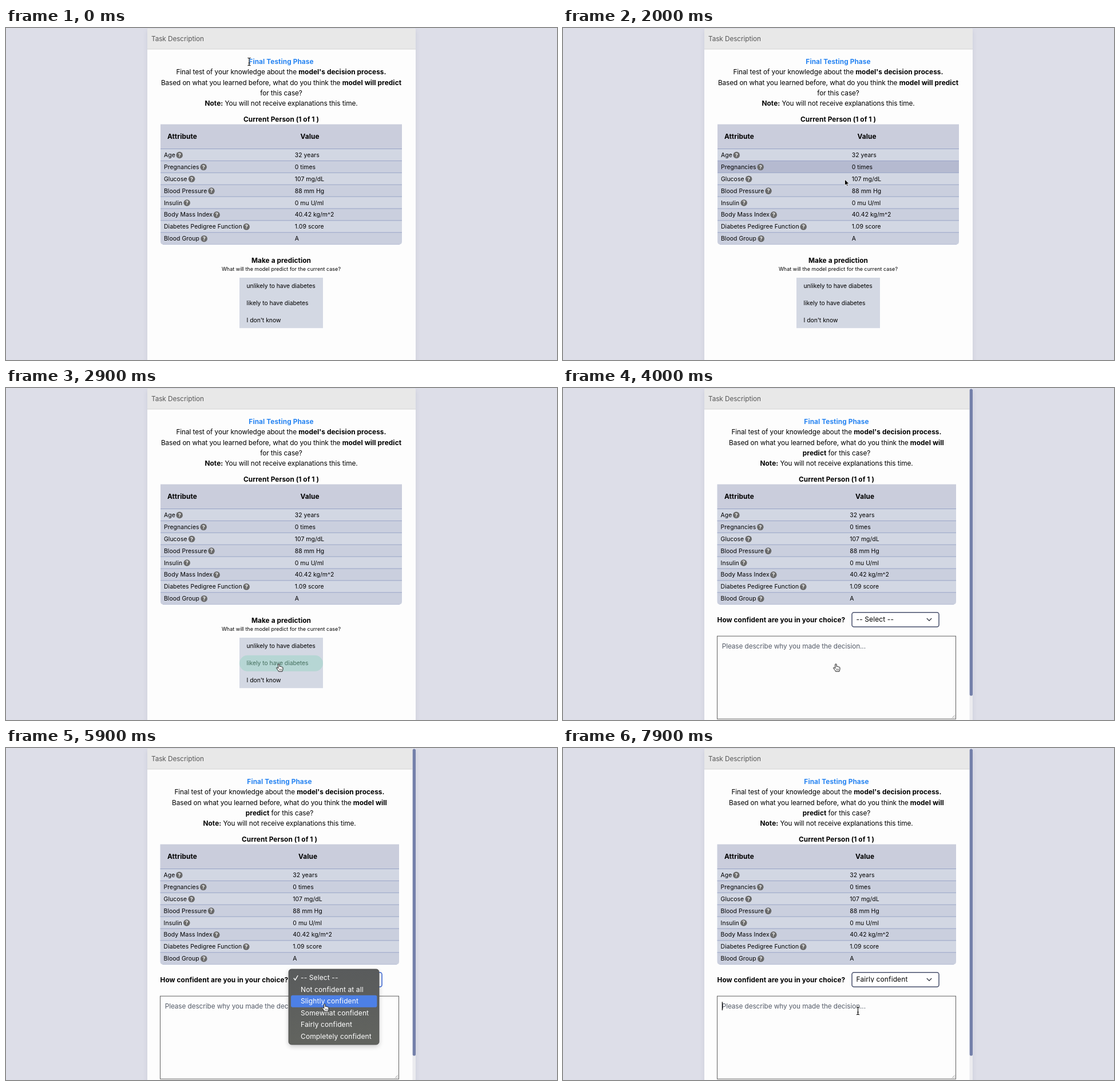
Animation, 963 px wide and 581 px high, one loop 8000 ms. Source, as an HTML page:

```html
<!DOCTYPE html>
<html lang="en">
<head>
<meta charset="utf-8">
<title>Task Description</title>
<style>
html, body { margin: 0; width: 100%; height: 100%; overflow: hidden; background: #dddee8; }
svg { display: block; width: 963px; height: 581px; }
text { font: 11.8px Inter, "Open Sans", sans-serif; letter-spacing: -.007em; fill: #000; white-space: pre; }
.b { font-weight: 700; letter-spacing: .008em; }
.row { font-size: 10.4px; letter-spacing: .006em; }
.pick { font-size: 10.4px; letter-spacing: -.003em; }
.small { font-size: 8.95px; letter-spacing: .006em; }
.ctl { font-size: 12px; letter-spacing: .01em; }
.mid { text-anchor: middle; }
</style>
</head>
<body>
<svg id="stage" viewBox="0 0 963 581" xmlns="http://www.w3.org/2000/svg">
  <defs>
    <filter id="soft" x="-10%" y="-10%" width="120%" height="120%"><feGaussianBlur stdDeviation="4"/></filter>
    <clipPath id="selClip"><rect x="506" y="393" width="125" height="17.3"/></clipPath>
    <linearGradient id="menuFill" x2="0" y2="1">
      <stop offset="0" stop-color="#595b5c"/><stop offset="1" stop-color="#62645f"/>
    </linearGradient>
  </defs>
</svg>
<script>
const NS = 'http://www.w3.org/2000/svg';
const LOOP = 8000, STEP = 100;
const SWITCH = 3800, OPEN = 5300, CLOSE = 7000, CARET = 7800;
const ROW_TOP = 211.5, ROW_H = 20.9;

const rows = [
  ['Age', '32 years', 303.2],
  ['Pregnancies', '0 times', 345.2],
  ['Glucose', '107 mg/dL', 324.6],
  ['Blood Pressure', '88 mm Hg', 359],
  ['Insulin', '0 mu U/ml', 316.2],
  ['Body Mass Index', '40.42 kg/m^2', 368.2],
  ['Diabetes Pedigree Function', '1.09 score', 420.2],
  ['Blood Group', 'A', 346.2]
];
const options = ['unlikely to have diabetes', 'likely to have diabetes', "I don't know"];
const levels = ['-- Select --', 'Not confident at all', 'Slightly confident',
  'Somewhat confident', 'Fairly confident', 'Completely confident'];

// pointer hot spot: time, x, y
const path = [
  [0, 425, 59], [100, 425, 59], [500, 470, 66], [900, 505, 84], [1300, 520, 118],
  [1800, 496, 200], [2000, 492.5, 265], [2300, 485, 345], [2700, 477, 478], [2900, 477, 483],
  [4200, 477, 483], [4700, 535, 440], [5000, 566, 409], [5300, 566, 409],
  [5900, 557, 448], [6100, 556, 452], [6500, 553.5, 483], [6700, 553.5, 484],
  [7000, 553.5, 484], [7500, 515.5, 460], [8000, 515.5, 460]
];

const stage = document.getElementById('stage');

function add(parent, tag, attrs, text) {
  const el = document.createElementNS(NS, tag);
  for (const k in attrs) el.setAttribute(k, attrs[k]);
  if (text !== undefined) el.textContent = text;
  parent.appendChild(el);
  return el;
}
const group = parent => add(parent, 'g', {});
const rect = (p, x, y, width, height, fill, more) => add(p, 'rect', { x, y, width, height, fill, ...more });
const label = (p, x, y, str, cls = '', more) => add(p, 'text', { x, y, class: cls, ...more }, str);
const show = (el, on) => el.setAttribute('visibility', on ? 'visible' : 'hidden');

// centred line; parts between asterisks are bold
function line(p, x, y, str) {
  const el = label(p, x, y, '', 'mid');
  str.split('*').forEach((s, i) => { if (s) add(el, 'tspan', i % 2 ? { class: 'b' } : {}, s); });
}

function table(p, x, w, dx, valueX) {
  const end = ROW_TOP + rows.length * ROW_H;
  rect(p, x, 168.5, w, ROW_TOP - 168.5, '#cacddc');
  label(p, 282, 194.3, 'Attribute', 'b');
  label(p, valueX + 9.8, 194.3, 'Value', 'b');
  const fills = rows.map(([name, value, icon], i) => {
    const y = ROW_TOP + i * ROW_H, last = i === rows.length - 1;
    const d = last
      ? `M${x} ${y}h${w}V${end - 5}q0 5-5 5H${x + 5}q-5 0-5-5Z`
      : `M${x} ${y}h${w}v${ROW_H}h${-w}Z`;
    const fill = add(p, 'path', { d });
    add(p, 'path', { d: `M${x} ${y}h${w}`, stroke: '#98a3c6', 'stroke-width': 1 });
    label(p, 276 + dx, y + 14.4, name, 'row');
    label(p, valueX, y + 14.4, value, 'row');
    add(p, 'circle', { cx: icon + dx, cy: y + 10.9, r: 5.8, fill: '#6b6b6b' });
    label(p, icon + dx, y + 14.2, '?', 'b mid', { style: 'font-size:9px;fill:#fff' });
    return fill;
  });
  add(p, 'path', { d: `M${x + 4} ${end}h${w - 8}`, stroke: '#a9b2cc', 'stroke-width': .8 });
  return fills;
}

function scene(cx, wrapped, x, w, dx, valueX) {
  const g = group(stage);
  label(g, cx, 63.2, 'Final Testing Phase', 'b mid', { style: 'fill:#2784f2' });
  line(g, cx, 81.4, "Final test of your knowledge about the *model's decision process.*");
  line(g, cx, 99.8, 'Based on what you learned before, what do you think the *model will' + (wrapped ? '*' : ' predict*'));
  line(g, cx, 118.1, (wrapped ? '*predict* ' : '') + 'for this case?');
  line(g, cx, 136.4, '*Note:* You will not receive explanations this time.');
  label(g, cx, 164, 'Current Person (1 of 1 )', 'b mid');
  return { g, fills: table(g, x, w, dx, valueX) };
}

// panel
rect(stage, 247, 4, 469, 590, '#7d82a0', { opacity: .2, filter: 'url(#soft)' });
rect(stage, 247, 1, 469, 600, '#fdfdfd', { rx: 3 });
add(stage, 'path', { d: 'M247 37V4q0-3 3-3H713q3 0 3 3V37Z', fill: '#e8e8e8' });
rect(stage, 247, 36.5, 469, 1, '#d6d6d6');
label(stage, 254, 22.8, 'Task Description', '', { style: 'fill:#575757' });

// first view: prediction
const ask = scene(481, false, 270, 422, 0, 504.7);
label(ask.g, 481, 411, 'Make a prediction', 'b mid');
label(ask.g, 481, 424.8, 'What will the model predict for the current case?', 'small mid');
rect(ask.g, 408, 437, 146, 88.2, '#d3d8e3');
const picks = options.map((str, i) => ({
  pill: rect(ask.g, 408, 437.4 + i * 30.4, 146, 28, '#b6d6d4', { rx: 14 }),
  text: label(ask.g, 420.5, 454.6 + i * 30.4, str, 'pick')
}));

// second view: confidence form
const form = scene(478, true, 269.5, 417.5, -.4, 501.3);
rect(form.g, 710.5, 1, 5.5, 580, '#ebebef');
rect(form.g, 710.7, 1.5, 5.3, 537, '#7480aa', { rx: 2.6 });
label(form.g, 269.5, 409.5, 'How confident are you in your choice?', 'b');
const select = rect(form.g, 505, 392.7, 152, 25.2, '#fff', { rx: 3.5, 'stroke-width': 1.5 });
const chosen = label(form.g, 512.5, 409.4, '', 'ctl', { 'clip-path': 'url(#selClip)' });
add(form.g, 'path', { d: 'M635.8 403l4.2 4.2 4.2-4.2', fill: 'none', stroke: '#3c404c', 'stroke-width': 1.4 });
rect(form.g, 269.5, 434.2, 417, 145, '#fdfdfd', { stroke: '#606060', 'stroke-width': 1 });
add(form.g, 'path', { d: 'M680 577.5l5-5M683 577.5l2-2', stroke: '#777', 'stroke-width': .8 });
label(form.g, 277.7, 455.8, 'Please describe why you made the decision...', '', { style: 'fill:#555c69' });
const caret = rect(form.g, 277.8, 444.3, 1.2, 14.7, '#000');

// drop-down list
const menu = group(stage);
rect(menu, 494, 390, 158, 132, '#000', { rx: 5, opacity: .22, filter: 'url(#soft)' });
rect(menu, 494, 387, 158, 132, 'url(#menuFill)', { rx: 5, stroke: '#4a4a4a', 'stroke-width': .8 });
const bar = rect(menu, 498, 0, 150.4, 21, '#4d80e6', { rx: 3 });
levels.forEach((str, i) => label(menu, 515, 406.2 + i * 20.55, str, 'ctl', { style: 'fill:#fff' }));
add(menu, 'path', { d: 'M502.8 402.6l2.6 3.4 4.8-8', fill: 'none', stroke: '#fff', 'stroke-width': 1.4 });

// pointers
const beamD = 'M-2.6-6.7C-1-6.7 0-6.2 0-5V5C0 6.2-1 6.7-2.6 6.7M2.6-6.7C1-6.7 0-6.2 0-5M0 5C0 6.2 1 6.7 2.6 6.7M-1.5 2.2H1.5';
const pointers = { beam: group(stage), arrow: group(stage), hand: group(stage) };
add(pointers.beam, 'path', { d: beamD, fill: 'none', stroke: '#fff', 'stroke-width': 2.2, opacity: .7 });
add(pointers.beam, 'path', { d: beamD, fill: 'none', stroke: '#111', 'stroke-width': 1.1 });
add(pointers.arrow, 'path', {
  d: 'M0 0V10.6L2.5 8.3L4.1 12L5.8 11.2L4.2 7.7H7.6Z',
  fill: '#000', stroke: '#fff', 'stroke-width': .8
});
add(pointers.hand, 'path', {
  d: 'M-1.3 .9C-1.3-.5 1.1-.5 1.1 .9V4.6C1.6 3.8 3 4 3.2 5C3.8 4.3 5 4.6 5.1 5.5C5.8 5 6.9 5.4 6.9 6.4V9.2C6.9 10.6 6.1 11.2 5.9 13H-.6C-.9 11.4-2.6 9.8-4.3 7.4C-5 6.3-3.6 5.6-2.7 6.5L-1.3 7.9Z',
  fill: '#fff', stroke: '#111', 'stroke-width': 1, 'stroke-linejoin': 'round'
});
add(pointers.hand, 'path', { d: 'M.9 8.2V11.2M2.7 8.2V11.2M4.5 8.2V11.2', stroke: '#333', 'stroke-width': .7 });

// monotone cubic through the path points
function slope(i, c) {
  if (i < 1 || i >= path.length - 1) return 0;
  const [p, q, r] = [path[i - 1], path[i], path[i + 1]];
  const a = (q[c] - p[c]) / (q[0] - p[0]), b = (r[c] - q[c]) / (r[0] - q[0]);
  return a * b > 0 ? 2 * a * b / (a + b) : 0;
}
function at(t) {
  t = Math.max(0, t);
  let i = 0;
  while (i < path.length - 2 && path[i + 1][0] <= t) i++;
  const p = path[i], q = path[i + 1], h = q[0] - p[0], u = (t - p[0]) / h;
  const s = u * u * (3 - 2 * u);
  return [1, 2].map(c => p[c] + (q[c] - p[c]) * s
    + h * u * (1 - u) * ((1 - u) * slope(i, c) - u * slope(i + 1, c)));
}

function pointerKind(t, x, y) {
  if (t < SWITCH) {
    if (y < 168) return 'beam';
    return y > 437 && y < 525 && x > 408 && x < 554 ? 'hand' : 'arrow';
  }
  if (t <= 4200 || t >= OPEN && t < CLOSE) return 'hand';
  if (y > 434) return 'beam';
  return y < 418 && x > 505 ? 'hand' : 'arrow';
}

function draw(t) {
  const [x, y] = at(t), first = t < SWITCH;
  show(ask.g, first);
  show(form.g, !first);

  const hover = first ? Math.floor((at(t - 90)[1] - ROW_TOP) / ROW_H) : -1;
  for (const view of [ask, form]) view.fills.forEach((f, i) =>
    f.setAttribute('fill', i === hover ? '#b5bad0' : i % 2 ? '#cacfde' : '#d2d7e3'));

  const pick = first ? Math.floor((y - 437) / 30.4) : -1;
  picks.forEach((o, i) => {
    show(o.pill, first && i === pick);
    o.text.style.fill = i === pick ? '#45705f' : '#000';
  });

  const open = t >= OPEN && t < CLOSE;
  show(menu, open);
  bar.setAttribute('y', 391.7 + 20.55 * Math.floor((y - 391.7) / 20.55));
  select.setAttribute('stroke', open ? '#3a66d6' : '#474f6c');
  chosen.textContent = levels[t < CLOSE ? 0 : 4];
  show(caret, t >= CARET);

  const kind = pointerKind(t, x, y);
  for (const k in pointers) {
    show(pointers[k], k === kind);
    pointers[k].setAttribute('transform', `translate(${x.toFixed(2)} ${y.toFixed(2)})`);
  }
}

const start = performance.now();
function tick() {
  const t = (performance.now() - start) % LOOP;
  draw(Math.floor(t / STEP) * STEP);
  requestAnimationFrame(tick);
}
tick();
</script>
</body>
</html>
```
